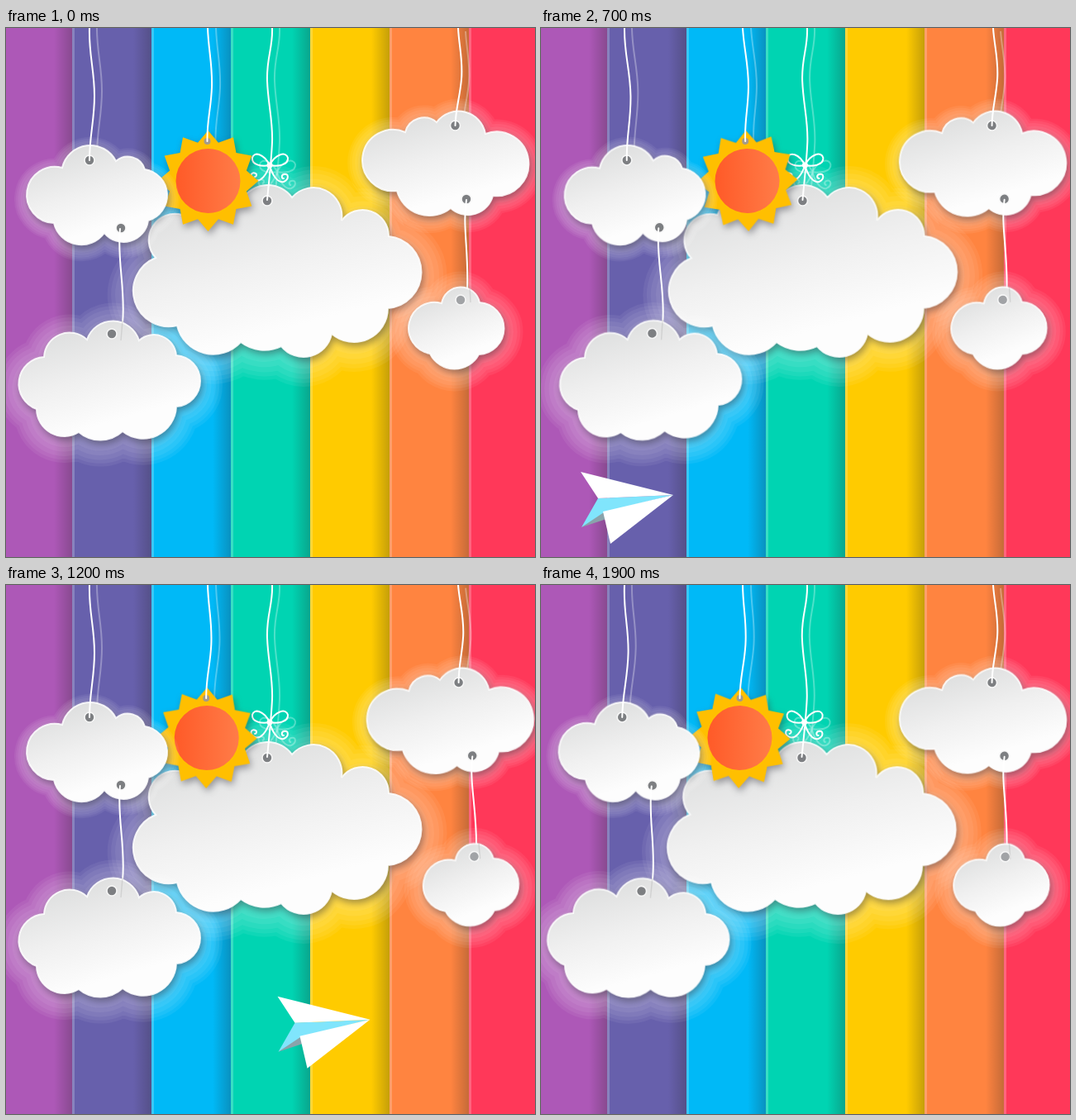
An HTML page that plays this animation: 640 by 640 pixels, repeating every 2 s.

```html
<!DOCTYPE html>
<html lang="en">
<head>
<meta charset="utf-8">
<title>Paper clouds on a rainbow</title>
<style>
  html, body { margin: 0; width: 100%; height: 100%; overflow: hidden; }
  svg { display: block; width: 100vw; height: 100vh; }
  .string { fill: none; stroke: #fff; stroke-width: 2; stroke-linecap: round; }
  .echo { fill: none; stroke: #fff; stroke-width: 2; opacity: .3; }
  .glow path { fill: none; stroke: #fff; stroke-linejoin: round; opacity: .06; }
  .paper { fill: url(#paper); stroke: #fff; stroke-opacity: .85; stroke-width: 2; }
  .lift { filter: drop-shadow(2px 4px 4px rgba(50, 50, 60, .45)); }
</style>
</head>
<body>
<svg id="stage" viewBox="0 0 640 640">
  <defs>
    <linearGradient id="paper" x1=".25" y1="0" x2=".7" y2="1">
      <stop offset="0" stop-color="#dbdcdc"/>
      <stop offset=".45" stop-color="#f0f0f0"/>
      <stop offset=".8" stop-color="#fdfdfd"/>
    </linearGradient>
    <linearGradient id="disc">
      <stop offset="0" stop-color="#ff5a28"/>
      <stop offset="1" stop-color="#ff7c48"/>
    </linearGradient>
    <linearGradient id="fold">
      <stop offset="0" stop-color="#222" stop-opacity="0"/>
      <stop offset="1" stop-color="#222" stop-opacity=".26"/>
    </linearGradient>
  </defs>
  <g id="stripes"></g>
  <g id="big"></g>
  <g id="sun"></g>
  <g id="right"></g>
  <g id="left"></g>
  <g id="plane">
    <path fill="#8aa3ab" d="M49 604L75 584L79 594Z"/>
    <path fill="#80e5fc" d="M69 569L160 565L76 586L49 604Z"/>
    <path fill="#fff" d="M48 537L160 565L69 569Z"/>
    <path fill="#fff" d="M160 565L84 624L75 585Z"/>
  </g>
</svg>
<script>
const el = id => document.getElementById(id);

const stripeColors = ['#ad58b7', '#6760ac', '#00b9f7', '#00d4b2', '#ffcb00', '#ff8440', '#ff3859'];
el('stripes').innerHTML = stripeColors.map((color, i) => {
  const x = i * 96 - 16;
  const isLast = i === stripeColors.length - 1;
  return `<rect x="${x}" width="97" height="640" fill="${color}"/>` +
    (i ? `<rect x="${x}" width="3" height="640" fill="#fff" opacity=".22"/>` : '') +
    (isLast ? '' : `<rect x="${x + 74}" width="22" height="640" fill="url(#fold)"/>`);
}).join('');

// Each point is [x, y, height of the bulge towards the next point].
function scallops(points) {
  const arcs = points.map(([x, y, bulge], i) => {
    const [nx, ny] = points[(i + 1) % points.length];
    const half = Math.hypot(nx - x, ny - y) / 2;
    const r = (half * half + bulge * bulge) / (2 * bulge);
    return `A${r} ${r} 0 ${bulge > half ? 1 : 0} 1 ${nx} ${ny}`;
  });
  return `M${points[0][0]} ${points[0][1]}${arcs.join('')}Z`;
}

function cloud(points, spread, drop) {
  const d = scallops(points);
  const rings = [1, .86, .7, .5, .3].map(k => `<path d="${d}" stroke-width="${2 * spread * k}"/>`);
  return `<g class="glow" transform="translate(0 ${drop})">${rings.join('')}</g>` +
    `<path class="paper lift" d="${d}"/>`;
}

const hole = (x, y, color = '#7d7f82') =>
  `<circle cx="${x}" cy="${y}" r="6" fill="${color}" stroke="#f6f6f6" stroke-width="1.6"/>`;
const thread = d => `<path class="string" d="${d}"/>`;
const echo = (d, dx, dy = 0) => `<path class="echo" d="${d}" transform="translate(${dx} ${dy})"/>`;

const bigString = 'M322 0C323 24 315 36 316 64C317 92 323 112 322 138C321 162 318 186 316 208';
const bow = 'M319 166C312 152 300 149 298 157C297 166 310 168 319 166C326 152 339 149 341 157C342 166 328 168 319 166' +
  'C315 178 308 187 301 184C294 181 296 173 302 176C304 177 303 180 301 180' +
  'M319 166C322 178 329 188 336 186C343 183 342 175 336 177C333 178 333 182 336 182';
el('big').innerHTML =
  echo(bigString, 9) + echo(bow, 9, 8) +
  cloud([[286, 207, 16], [346, 205, 25], [406, 233, 22], [463, 252, 40], [462, 339, 24], [394, 370, 20],
    [333, 385, 7], [284, 380, 24], [207, 360, 40], [181, 278, 23], [213, 226, 20]], 31, 5) +
  hole(316, 209) + thread(bigString) + thread(bow) +
  '<circle cx="319" cy="166" r="3.5" fill="#fff"/>';

const teeth = Array.from({ length: 24 }, (_, i) => {
  const r = i % 2 ? 48 : 61;
  const a = i * Math.PI / 12;
  return `${244.5 + r * Math.sin(a)},${185 - r * Math.cos(a)}`;
}).join(' ');
const sunString = 'M244 0C245 28 250 44 249 72C248 98 243 112 243.5 137';
el('sun').innerHTML =
  echo(sunString, 10) +
  `<polygon class="lift" points="${teeth}" fill="#ffbf00"/>` +
  '<circle cx="244.5" cy="185" r="39" fill="url(#disc)"/>' +
  '<circle cx="243.5" cy="137" r="4" fill="#a39a8c"/>' + thread(sunString);

const rightString = 'M547 0C548 22 553 38 551 62C549 84 544 98 543.5 118';
const rightLink = 'M557 208C552 240 560 270 558 318';
el('right').innerHTML =
  echo(rightString, 9, 4) +
  cloud([[521, 114, 20], [580, 128, 48], [589, 203, 15], [538, 218, 18.5], [473, 197, 47], [483, 126, 11]], 18, 3) +
  hole(543.5, 118) + hole(557, 207) + thread(rightString) + thread(rightLink) +
  '<g id="small">' +
  cloud([[527, 333, 19], [573, 332, 30], [572, 395, 18], [513, 394, 33]], 23, 4) +
  hole(550, 329, '#a1a3a6') + '</g>' +
  '<path d="M561 312L562 332" stroke="#999" stroke-width="1.5" opacity=".25"/>';

const leftString = 'M101 0C100 32 107 50 107 82C107 112 101 130 101 160';
const leftLink = 'M138 243C134 280 145 318 141 357';
el('left').innerHTML =
  echo(leftString, 9, -6) +
  cloud([[68, 169, 23], [133, 161, 10], [168, 171, 25], [172, 233, 18], [119, 248, 20], [58, 236, 38]], 15, 5) +
  hole(101, 160) + hole(139, 242) + thread(leftString) + thread(leftLink) +
  cloud([[98, 377, 23], [161, 378, 15], [206, 396, 29], [206, 458, 22], [141, 488, 10], [88, 489, 17],
    [37, 461, 26], [46, 398, 18]], 27, 5) +
  hole(128, 370) +
  '<path d="M141 354L139 378" stroke="#999" stroke-width="1.5" opacity=".25"/>';

// Triangle wave from -1 to 1 over eight steps, lowest at the given step.
function sway(step, lowest) {
  const d = (step - lowest + 16) % 8;
  return d < 4 ? d / 2 - 1 : 3 - d / 2;
}

const turn = (id, degrees, pivotX) =>
  el(id).setAttribute('transform', `rotate(${-degrees} ${pivotX} 0)`);
const move = (id, x, y) => el(id).setAttribute('transform', `translate(${x} ${y})`);

function draw(now) {
  const step = Math.floor(now / 100) % 20;
  turn('left', 2 * sway(step, 2), 101);
  turn('big', .27 * sway(step, 2), 322);
  turn('right', 1 + 2 * sway(step, 1), 547);
  turn('sun', step < 3 ? -.42 * step : .15 + 1.4 * sway(step, 3), 244);
  move('small', Math.min(step * .42, 5.9), 0);
  move('plane', 56.1 * (step - 7), -7.85 * (step - 7));
}

const start = performance.now();
function tick() {
  draw(performance.now() - start);
  requestAnimationFrame(tick);
}
tick();
</script>
</body>
</html>
```
